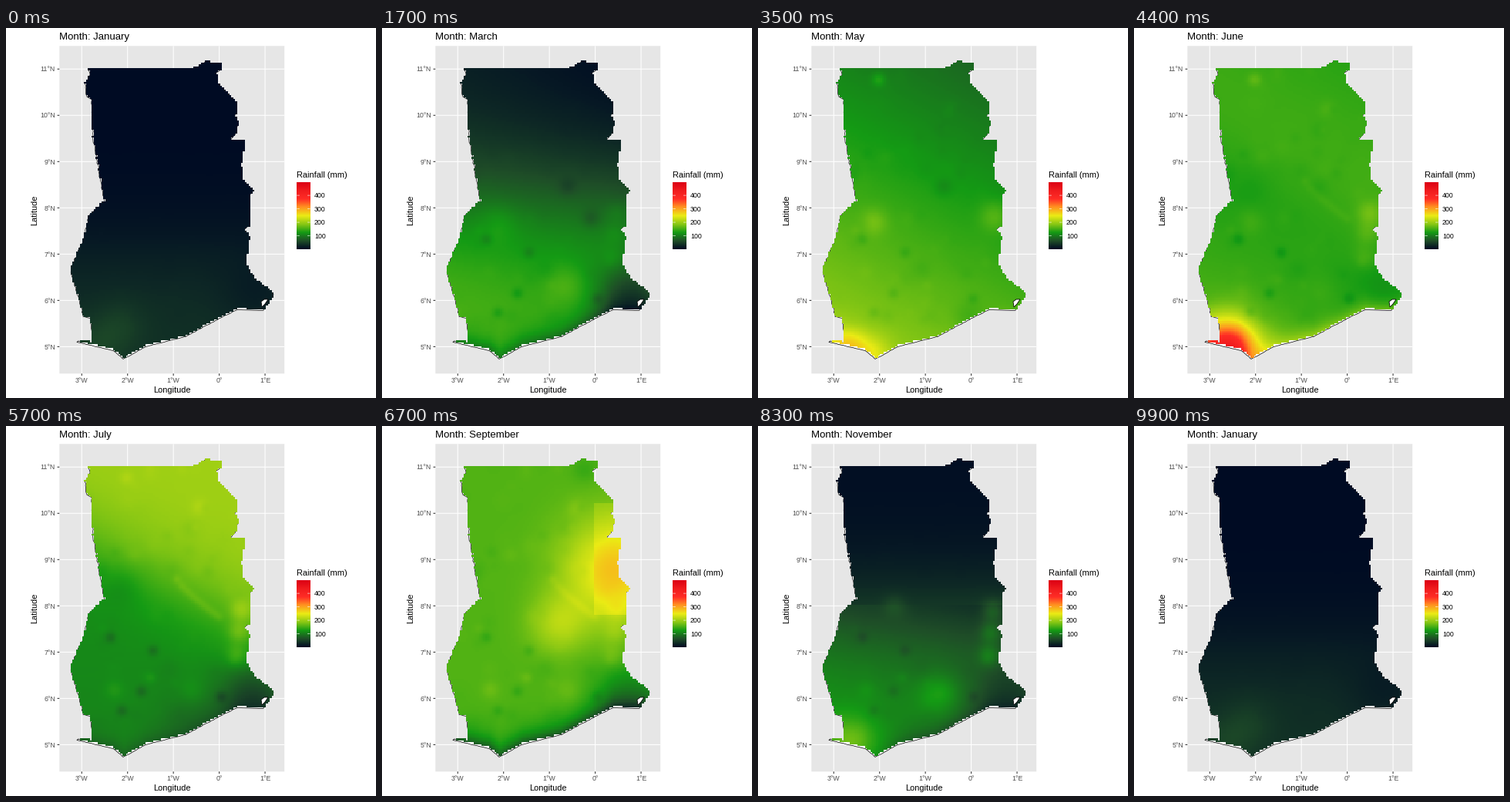
Recreate the animation shown at these times as a matplotlib script. Size 480 by 480 pixels, loop 10 s.

```python
import numpy as np
import matplotlib
import matplotlib.pyplot as plt
from matplotlib.animation import FuncAnimation
from matplotlib.colors import LinearSegmentedColormap
from matplotlib.path import Path

matplotlib.rcParams["font.family"] = "Liberation Sans"

SIZE, DPI = 480, 80
PT = 72 / DPI                       # points per pixel
TOP_MM = 495
PER_DEG = 24                        # raster cells per degree
MONTHS = ["January", "February", "March", "April", "May", "June", "July",
          "August", "September", "October", "November", "December"]
HOLD_END = [6, 15, 24, 33, 42, 50, 57, 65, 73, 81, 89, 97]

STOPS = [(0, 10, 35), (31, 78, 40), (20, 155, 20), (138, 200, 20), (235, 235, 20),
         (255, 150, 32), (255, 45, 38), (240, 28, 30), (220, 0, 20)]
RAIN = LinearSegmentedColormap.from_list("rain", np.array(STOPS) / 255, 512)

# Key points of the border, clockwise
NORTH = [(107, 53), (240, 53), (247, 51), (260, 42), (264, 45), (277, 47), (277, 55), (272, 57)]
EAST = [(272, 72), (282, 82), (299, 98), (296, 116), (300, 124), (297, 137), (291, 145),
        (308, 145), (303, 180), (306, 198), (319, 211), (314, 218), (314, 256), (307, 263),
        (314, 271), (309, 305), (320, 325), (346, 345), (335, 361)]
COAST = [(333, 366), (299, 365), (281, 374), (232, 400), (180, 413), (152, 429), (138, 418),
         (92, 407)]
WEST = [(92, 405.5), (112, 408), (109, 376), (100, 374), (94, 350), (84, 318), (84, 310),
        (101, 272), (107, 243), (127, 226), (117, 168), (112, 140), (111, 93), (104, 88),
        (102, 72), (108, 62)]


def px(lon):
    return 276.6 + 59.45 * lon


def py(lat):
    return 53.25 + 60.03 * (11 - lat)


def rough(points, rng, amount=0.9):
    """Resample a closed outline in short steps and shake it sideways."""
    p = np.array(points + points[:1], float) + 0.5
    along = np.r_[0, np.cumsum(np.hypot(*np.diff(p, axis=0).T))]
    t = np.union1d(np.arange(0, along[-1], 3), along)
    x, y = (np.interp(t, along, c) for c in p.T)
    return np.column_stack([x + rng.uniform(-amount, amount, len(t)), y])


border = rough(NORTH + EAST + COAST + WEST, np.random.default_rng(4))

west, east, south, north = -3.5, 1.5, 4.5, 11.5
lons = np.arange(west, east, 1 / PER_DEG) + 0.5 / PER_DEG
lats = np.arange(north, south, -1 / PER_DEG) - 0.5 / PER_DEG
LON, LAT = np.meshgrid(lons, lats)
X, Y = px(LON), py(LAT)


def bump(x, y, r):
    return np.exp(-((X - x) ** 2 + (Y - y) ** 2) / (2 * r * r))


def band(top, bottom, middle, width):
    """Rainfall that slides from bottom to top around one latitude."""
    return bottom + (top - bottom) / (1 + np.exp((middle - LAT) / width))


cx, cy = np.array(COAST[::-1], float).T + 0.5
depth = np.interp(X, cx, cy) - Y
shore = np.exp(-np.maximum(depth, 0) / 14)
eastern = LON + 1
south_east = bump(322, 350, 32)
south_west = bump(118, 410, 24)
rift = sum(bump(x, y, 10) for x, y in [(304, 240), (301, 268), (299, 298)])
lake = sum(bump(221 + 54 * s, 200 + 48 * s ** 0.8, 4) for s in np.linspace(0, 1, 9)) / 2
dips = sum(bump(x, y, 5) for x, y in [(150, 370), (175, 345), (190, 292), (135, 275), (278, 352)])
peaks = bump(140, 343, 8) + bump(187, 327, 5) + bump(240, 345, 12)
station = bump(156, 68, 6)

rng = np.random.default_rng(11)
texture = sum(rng.normal() * bump(rng.uniform(85, 345), rng.uniform(45, 425), rng.uniform(4, 9))
              for _ in range(120))

jan = band(1, 36, 7, 0.6) + 16 * south_west + 14 * bump(150, 385, 22) - 12 * south_east
mar = (band(5, 152, 8.2, 0.9) - 5 * eastern - 75 * south_east - 65 * shore + 12 * rift
       + 18 * bump(150, 255, 18) + 20 * bump(238, 335, 18) - 18 * dips
       - 14 * bump(240, 207, 8) - 18 * bump(270, 248, 8))
may = (166 - 15 * (LAT - 6) - 8 * eastern + 28 * station + 25 * bump(150, 252, 12)
       + 30 * bump(306, 245, 14) - 15 * bump(240, 207, 8) - 15 * bump(272, 376, 14)
       - 12 * dips + 75 * bump(112, 414, 18) + 50 * bump(146, 424, 18))
midsummer = (band(200, 108, 8.4 - 0.5 * eastern, 0.55) - 55 * south_east - 32 * shore
             + 12 * station + 22 * lake + 30 * rift + 14 * peaks - 22 * dips
             - 14 * bump(150, 210, 18) - 15 * bump(235, 375, 30))
sep = (156 + 105 * bump(300, 188, 48) + 50 * bump(228, 258, 26) + 18 * lake + 16 * rift
       + 18 * (LON > -0.05) * (LAT > 7.8) * (LAT < 10.2) - 45 * south_east - 95 * shore
       + 14 * peaks - 14 * dips - 15 * bump(262, 58, 12))
nov = (band(4, 110, 7.6, 0.7) - 6 * eastern * (LAT < 8) + 55 * south_west + 35 * rift
       + 25 * bump(230, 350, 18) - 35 * south_east + 18 * bump(176, 234, 10)
       - 40 * shore * np.clip((X - 130) / 70, 0.1, 1) - 14 * dips + 10 * peaks)

shift = 38 * np.tanh((235 - Y) / 90)
jul, aug = midsummer - shift / 3, midsummer + shift * 2 / 3
feb = 0.55 * jan + 0.42 * mar
apr = 0.45 * mar + 0.52 * may
jun = 0.5 * (may + jul) + 190 * bump(122, 412, 27) + 70 * shore
octo = 0.42 * sep + 0.6 * nov + 25
dec = 0.55 * jan + 0.3 * nov

# A cell is drawn when it touches the land; the sea side stays bare
shape = Path(border)
land = np.zeros(X.shape, bool)
for dx in (-0.8, 0.8):
    for dy in (0, 0.8):
        spots = np.column_stack([(X + dx).ravel(), (Y + dy).ravel()])
        land |= shape.contains_points(spots).reshape(X.shape)
land &= depth > 1.2


def paint(field):
    wet = field + texture * np.clip(field / 45, 0, 4)
    rgba = RAIN(np.clip(wet / TOP_MM, 0, 1))
    rgba[..., 3] = land
    return rgba


maps = [paint(m) for m in (jan, feb, mar, apr, may, jun, jul, aug, sep, octo, nov, dec)]

fig = plt.figure(figsize=(SIZE / DPI, SIZE / DPI), dpi=DPI, facecolor="white")
ax = fig.add_axes([0, 0, 1, 1])
ax.axis("off")


def text(x, y, s, size, color="black", **kw):
    kw.setdefault("va", "baseline")
    return ax.text(x, y, s, fontsize=size * PT, color=color, **kw)


def line(x, y, width, color, **kw):
    ax.plot(x, y, lw=width * PT, color=color, solid_capstyle="butt", snap=False, **kw)


# Panel, grid and axes
left, right, top, bottom = 69.3, 361.2, 23.3, 448.3
ax.add_patch(plt.Rectangle((left, top), right - left, bottom - top, fc="#E6E6E6",
                           ec="none", zorder=0, snap=False))
for lon in range(-3, 2):
    x = px(lon)
    name = f"{abs(lon)}°" + ("W" if lon < 0 else "E" if lon else "")
    line([x, x], [top, bottom], 1.07, "white", zorder=1)
    line([x, x], [bottom, bottom + 2.75], 1.07, "#333333")
    text(x, 460, name, 8.8, "#4D4D4D", ha="center")
for lat in range(5, 12):
    y = py(lat)
    line([left, right], [y, y], 1.07, "white", zorder=1)
    line([left - 2.75, left], [y, y], 1.07, "#333333")
    text(63.9, y + 3.2, f"{lat}°N", 8.8, "#4D4D4D", ha="right")
text(215, 473, "Longitude", 11, ha="center")
text(36.7, 236, "Latitude", 11, ha="center", va="center", rotation=90)
title = text(69.3, 15.4, "", 13.2)

# Country
ax.add_patch(plt.Polygon(border, fc="white", ec="black", lw=0.7 * PT, zorder=2))
picture = ax.imshow(maps[0], extent=(px(west), px(east), py(south), py(north)),
                    aspect="auto", interpolation="nearest", zorder=3)
ax.add_patch(plt.Polygon([(331, 355), (335, 352), (340, 352), (336, 358), (332, 362)],
                         fc="white", ec="black", lw=0.8 * PT, zorder=5))

# Legend
text(377, 194.3, "Rainfall (mm)", 11)
ax.imshow(np.linspace(1, 0, 300)[:, None], cmap=RAIN, extent=(377.3, 394.6, 287, 200.5),
          aspect="auto", zorder=3)
for mm in range(100, 500, 100):
    y = 287 - mm * 86.5 / TOP_MM
    for x in (377.3, 391.1):
        line([x, x + 3.5], [y, y], 0.6, "white", zorder=4)
    text(400, y + 3.1, str(mm), 8.8)

ax.set_xlim(0, SIZE)
ax.set_ylim(SIZE, 0)


def state(frame):
    """Current month, next month and the blend between them."""
    for i, end in enumerate(HOLD_END):
        steps = 2 if MONTHS[i] == "June" else 3
        if frame < end + steps:
            return i, (i + 1) % 12, max(0, frame - end + 1) / steps
    return 0, 1, 0


def draw(frame):
    a, b, t = state(frame)
    picture.set_data(maps[a] * (1 - t) + maps[b] * t)
    title.set_text("Month: " + MONTHS[b if t >= 0.5 else a])
    return picture, title


anim = FuncAnimation(fig, draw, frames=100, interval=100, repeat=True, repeat_delay=0)
plt.show()
```
